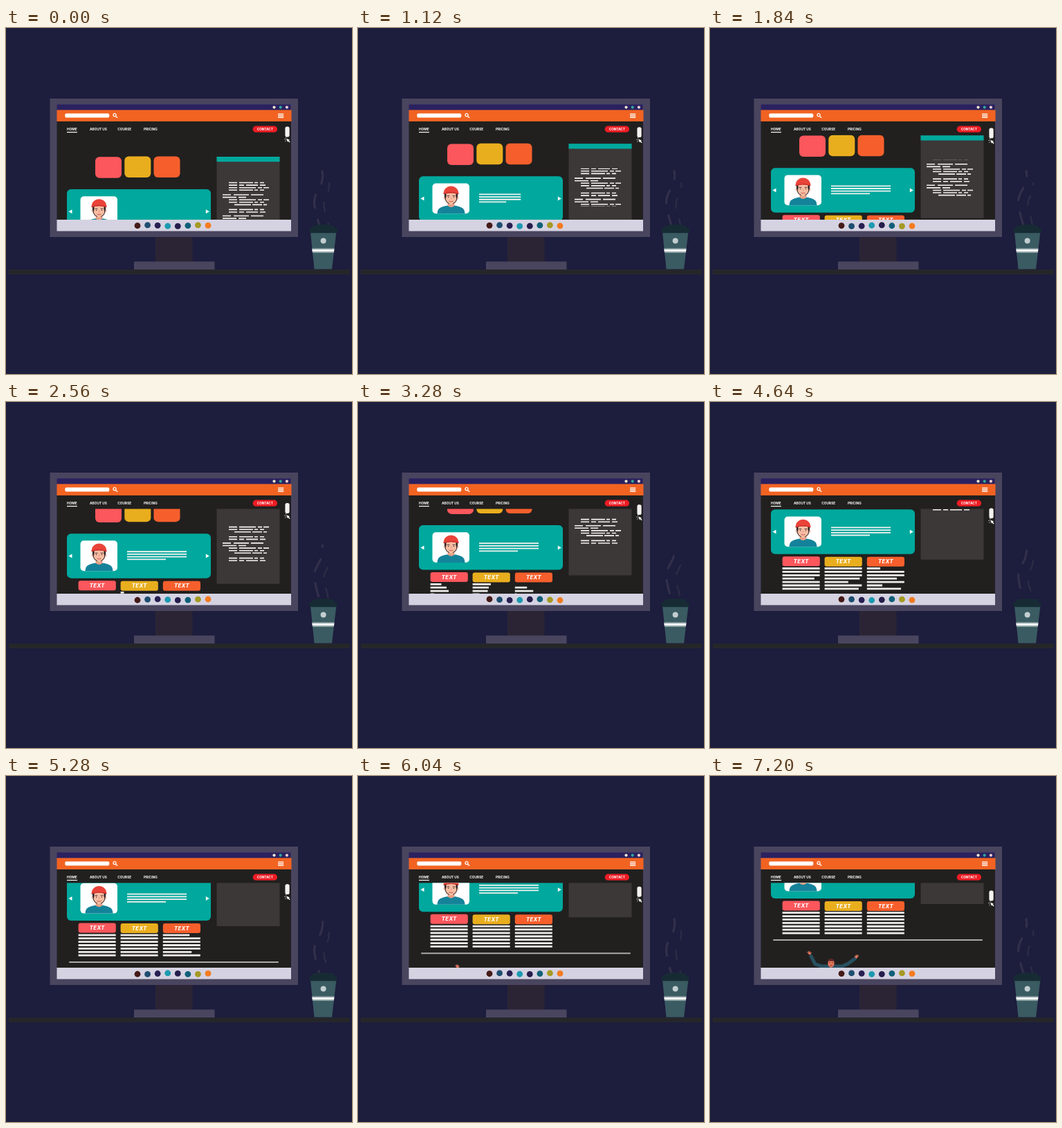
An HTML page with a canvas for the animation above (7.24 s loop, 500x500 px).

```html
<!DOCTYPE html>
<html lang="en">
<head>
<meta charset="utf-8">
<title>Scrolling web page on a desk monitor</title>
<style>
  html, body { margin: 0; width: 100%; height: 100%; overflow: hidden; background: #1d1d3d; }
  canvas { display: block; width: 500px; height: 500px; }
</style>
</head>
<body>
<canvas id="stage" width="500" height="500"></canvas>
<script>
const g = document.getElementById('stage').getContext('2d');
const LOOP = 7240, SPAN = 7.2;
const WHITE = '#f5f3f1', DARK = '#21201f', TEAL = '#00a89d', ORANGE = '#f26322';
const PINK = '#fb575c', YELLOW = '#e9ae1e', CORAL = '#f65f2c';
const clamp = v => Math.max(0, Math.min(1, v));

function box(x, y, w, h, fill, r = 0) {
  g.fillStyle = fill;
  g.beginPath();
  g.roundRect(x, y, w, h, r);
  g.fill();
}
function oval(x, y, rx, fill, ry = rx) {
  g.fillStyle = fill;
  g.beginPath();
  g.ellipse(x, y, rx, ry, 0, 0, 7);
  g.fill();
}
function poly(fill, ...p) {
  g.fillStyle = fill;
  g.beginPath();
  for (let i = 0; i < p.length; i += 2) g.lineTo(p[i], p[i + 1]);
  g.fill();
}
function shape(d, fill) {
  g.fillStyle = fill;
  g.fill(new Path2D(d));
}
function stroke(d, color, width) {
  g.strokeStyle = color;
  g.lineWidth = width;
  g.lineCap = g.lineJoin = 'round';
  g.stroke(new Path2D(d));
}
function label(s, x, y, font, align = 'left', spacing = 0) {
  g.fillStyle = '#fff';
  g.font = font + ' Inter, sans-serif';
  g.textAlign = align;
  g.letterSpacing = spacing + 'px';
  g.fillText(s, x, y);
}
function clipped(x, y, w, h, draw) {
  g.save();
  g.beginPath();
  g.rect(x, y, w, h);
  g.clip();
  draw();
  g.restore();
}

// Code rows: start x, then alternating dash and gap lengths
const ROWS = {
  A: [322, 12, 3, 20, 2, 5, 3, 6],
  B: [322, 12, 3, 7, 3, 17, 3, 8],
  C: [313, 12, 4, 22, 3, 18],
  D: [313, 20, 3, 11],
  E: [322, 12, 3, 24, 3, 6, 2, 8],
  F: [330, 24, 2, 14, 2, 5]
};
const GROUPS = [[223.5, 'ABEA'], [241, 'CDEAF'], [262.4, 'AB'], [271.5, 'CDEAF'], [293.2, 'AB']];

// Start time of each typed line, per column
const STARTS = [
  [2.75, 2.5, 2.4, 3.1, 2.65, 2.5, 2.6],
  [2.4, 2.5, 2.55, 2.95, 3.5, 2.85, 3],
  [4, 2.7, 2.4, 3.2, 2.5, 3.9, 3]
];

function room() {
  box(0, 0, 500, 500, '#1d1d3d');
  box(216, 295, 53.5, 43, '#2a2435');
  box(185, 337.5, 116.5, 11.5, '#4a455f');
  box(4, 349, 493, 7, '#25262a');
  box(63.5, 102, 358.5, 200, '#4a455f');
  box(73.5, 135, 338.5, 142, DARK);
}

function codeBox(t) {
  box(304.5, 186, 91, 119.5, '#3b3837');
  box(304.5, 186, 91, 7.3, TEAL);
  const shift = 44 * (1 - Math.cos(Math.PI * t / SPAN));
  clipped(304, 221.5, 92, 55, () => {
    for (const [y, rows] of GROUPS) [...rows].forEach((key, i) => {
      let [x, ...parts] = ROWS[key];
      parts.forEach((w, j) => {
        if (j % 2 === 0) box(x, y + i * 3.6 - shift - .8, w, 1.6, WHITE);
        x += w;
      });
    });
  });
}

function avatar() {
  box(107.5, 243.2, 53.5, 43.8, '#fff', 5);
  shape('M114.5 287C115 279 119 277.5 128 275.5H141C150 277.5 154 279 154.5 287Z', '#14839a');
  shape('M129.5 268H139.5V275.5Q134.5 280 129.5 275.5Z', '#e59f86');
  oval(125.5, 264, 1.8, '#f0ae95', 2.4);
  oval(143.5, 264, 1.8, '#f0ae95', 2.4);
  shape('M125.5 256H143.5V264Q143 272.5 134.5 274Q126 272.5 125.5 264Z', '#f7bda3');
  shape('M124.7 257H127.5V262L126.5 267L125 262Z M144.3 257H141.5V262L142.5 267L144 262Z', '#2b2327');
  shape('M123.7 259C123 243.5 146 243.5 145.3 259Q134.5 255.5 123.7 259Z', '#ea4339');
  stroke('M124 258.2Q134.5 254.8 145 258.2', '#c9322c', 1.3);
  stroke('M129 261.2H132M137 261.2H140', '#3a2a2a', .9);
  oval(130.6, 263.4, .7, '#2b2327');
  oval(138.4, 263.4, .7, '#2b2327');
  stroke('M134.5 263.5V266.3', '#dd957c', .8);
  stroke('M132 269.2Q134.5 270.8 137 269.2', '#c0443c', .9);
  stroke('M126 266Q127 271 131.5 272.5M143 266Q142 271 137.5 272.5', '#2b2327', 1);
}

function slider(t) {
  box(88, 233, 208, 64.5, TEAL, 6);
  poly('#fff', 90.5, 265.3, 95.5, 262.3, 95.5, 268.3);
  poly('#fff', 293.8, 265.3, 288.8, 262.3, 288.8, 268.3);
  avatar();
  const p = clamp(t / 1.6);
  for (let i = 0; i < 4; i++)
    box(175, 258.2 + i * 3.7, (i < 3 ? 86 : 56) * p, 1.8, WHITE);
}

function columns(t) {
  [PINK, YELLOW, CORAL].forEach((color, c) => {
    const x = [104.6, 165.6, 226.8][c], drop = c ? .5 : 0;
    box(x, 301 + drop, 54.2, 14, color, 3);
    label('TEXT', x + 27.2, 310.6 + drop, 'italic 800 7.5px', 'center', .5);
    STARTS[c].forEach((s, i) =>
      box(x, 316.8 + i * 4.9, 54 * clamp((t - s) / 1.8), 2.8, '#eeecea'));
  });
  box(91, 356.5, 303, 2, '#aaa8a8', 1);
}

function hand(x, y, side) {
  g.save();
  g.translate(x, y);
  g.scale(side, 1);
  stroke('M0 0L-3.2 -1.8M0 0L-1.8 -3.2M0 0L.4 -3.2M0 0L2.4 -1.2', '#e8785c', 1.1);
  oval(0, 0, 1.7, '#e8785c');
  g.restore();
}

function waver() {
  stroke('M146 381L152 392.5L166 397L176 402L188 396.5L199 392L209.5 384.5', '#28505f', 5);
  poly('#28505f', 160, 393, 190, 393, 192, 412, 160, 412);
  hand(144, 377.2, 1);
  hand(211.5, 382.3, -1);
  oval(175, 391.3, 4.6, '#e8785c', 6);
  shape('M169.8 389.5C169 383 181 383 180.2 389.5L178.5 388H171.5Z', '#5b2526');
  stroke('M172.5 390.3H173.7M176.3 390.3H177.5M173.3 394.5Q175 393.5 176.7 394.5', '#5b2526', .8);
}

function page(t) {
  clipped(73.5, 154.5, 338.5, 122.5, () => {
    g.translate(0, -16.74 * t);
    box(129, 186.3, 38, 30.5, PINK, 6);
    box(171.3, 185.5, 38, 30.5, YELLOW, 6);
    box(213.5, 185.5, 38, 30.5, CORAL, 6);
    codeBox(t);
    slider(t);
    columns(t);
    waver();
  });
}

function browser() {
  box(73.5, 110.5, 338, 8.2, '#2a2160');
  ['#f1e6cf', '#2fa79b', '#f6cfd0'].forEach((c, i) => oval(387.5 + i * 9.2, 114.6, 2.1, c));
  box(73.5, 118.5, 339, 16.6, ORANGE);
  box(85.3, 123.6, 64, 6, '#fff', 2);
  stroke('M158.6 127.4L160.8 129.4', '#fff', 1.3);
  g.lineWidth = 1.2;
  g.beginPath();
  g.arc(157, 125.7, 2, 0, 7);
  g.stroke();
  for (let i = 0; i < 3; i++) box(393, 123.7 + i * 2.4, 8.2, 1.4, '#fff');

  const nav = { HOME: 88, 'ABOUT US': 121, COURSE: 161.3, PRICING: 199 };
  for (const name in nav) label(name, nav[name], 147.9, '700 4.8px');
  box(88, 150, 15, 1.2, '#fff');
  box(356.7, 141.6, 35.3, 9.2, '#ed1c24', 4.6);
  label('CONTACT', 374.3, 147.9, '700 4.7px', 'center');
}

function scrollbar(t) {
  g.save();
  g.translate(0, 23 * (1 - Math.cos(Math.PI / 2 * t / SPAN)));
  box(403.4, 142.6, 6.2, 14.8, WHITE, 2.6);
  poly('#fff', 405.2, 159.8, 410, 161.8, 408.7, 162.6, 410.6, 164.7, 409.6, 165.6, 407.7, 163.6, 406.8, 164.8);
  stroke('M402.8 160.6H403.8M403.6 163.6L404.4 162.9M404.6 157.8V158.4', '#fff', .8);
  g.restore();
}

function taskbar(t) {
  box(73.5, 277, 338.5, 16.6, '#d5d3e2');
  const colors = ['#451a17', '#1d4e70', '#272052', '#1c9ab0', '#251d4b', '#0f5f78', '#a59a24', '#f47b20'];
  colors.forEach((c, i) =>
    oval(190 + i * 14.57, 285.7 + .8 * Math.sin(t * Math.PI * 12 / (LOOP / 1000) - i * 1.3), 4.4, c));
}

function steam(t) {
  const wisp = (d, color, width, dash, gap, head) => {
    g.setLineDash([dash, gap]);
    g.lineDashOffset = dash - head - (dash + gap) * t / 6.04;
    stroke(d, color, width);
  };
  g.save();
  wisp('M453 285Q449 274 447 262Q443.6 250 448 240L455 227Q459 215 457 207', '#32304a', 3.2, 19, 18, 45);
  wisp('M466 285L463 271Q458 260 460 250Q461 246 463 243Q468 233 467 224', '#2c2b45', 2.6, 14, 17, 34);
  g.restore();
}

function cup() {
  poly('#3a5b62', 440, 295, 477.3, 295, 471, 348.6, 445.5, 348.6);
  shape('M438 293.5Q438 290 441 289.5L444 285.5Q458 282.5 473 285.5L475.5 289.5Q479 290 479 293.5L477.5 296.3H439.5Z', '#172b34');
  poly('#8fa3a6', 442.2, 318.3, 474.5, 318.3, 473.7, 325, 443, 325);
  poly('#fff', 442.4, 320, 474.3, 320, 474, 323, 442.8, 323);
  oval(458.6, 307.6, 4, '#c3ced0');
}

function frame() {
  const t = performance.now() % LOOP / 1000;
  room();
  page(t);
  browser();
  scrollbar(t);
  taskbar(t);
  steam(t);
  cup();
  requestAnimationFrame(frame);
}
frame();
</script>
</body>
</html>
```
